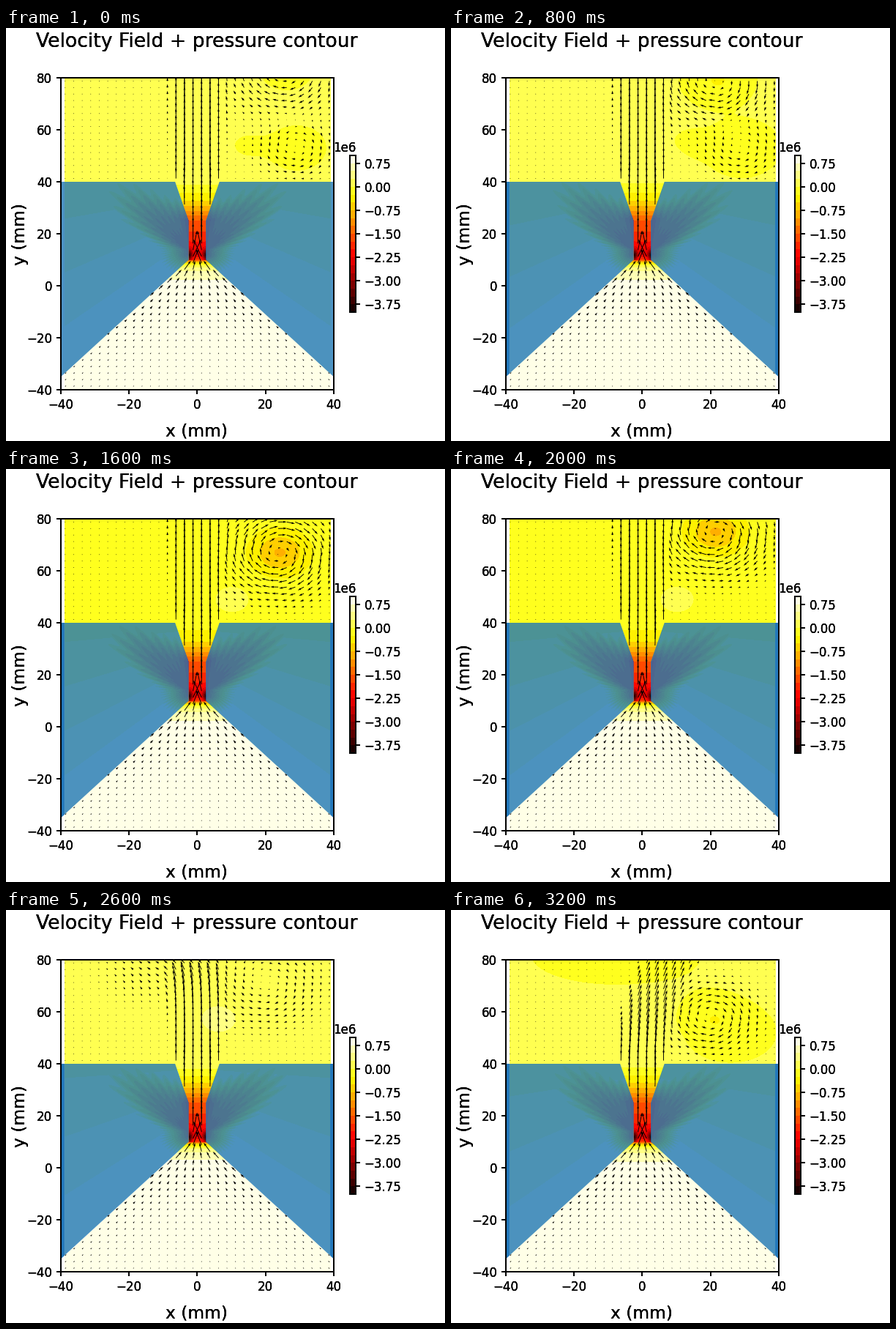
Animation of 600x564 px, one loop 3400 ms. Source, as a matplotlib script:

```python
import numpy as np
import matplotlib.pyplot as plt
from matplotlib.animation import FuncAnimation
from matplotlib.colors import BoundaryNorm, ListedColormap
from matplotlib.patches import Polygon

W, H, DPI = 600, 564, 120
FRAMES, INTERVAL = 17, 200
LEFT, TOP, RIGHT, BOTTOM = 75, 68, 447.8, 494
ASPECT = (RIGHT - LEFT) / 80 / ((BOTTOM - TOP) / 120)
TICK_PAD = 11.7

plt.rcParams.update({"font.family": "DejaVu Sans", "font.size": 10,
                     "axes.linewidth": 1.2, "xtick.major.width": 1.2,
                     "ytick.major.width": 1.2})


def bump(x, y, cx, cy, rx, ry=None):
    return np.exp(-((x - cx) / rx) ** 2 - ((y - cy) / (ry or rx)) ** 2)


def pulse(i, center, width):
    return np.exp(-((i - center) / width) ** 2)


def state(i):
    """Strength of each flow feature at step i."""
    steps = [0, 4, 6, 8, 11, 16]
    strong = pulse(i, 9, 4)
    sweep = pulse(i, 14, 1.3)
    late = np.clip((i - 14) / 2, 0, 1)
    return {
        "x": np.interp(i, steps, [26, 22, 21, 24, 20, 20]),
        "y": np.interp(i, steps, [83, 79, 70, 67, 79, 58]),
        "strong": strong,
        "sweep": sweep,
        "late": late,
        "pair": np.clip((6 - i) / 2, 0, 1),
        "base": .08 - .2 * strong + .33 * sweep,
        "lean": 8 * late,
    }


def half_width(y):
    return np.interp(y, [-40, 10, 25, 40, 40.001], [44.2, 2.5, 2.5, 6.5, 99])


def chamber_pressure(x, y, s):
    core = (.2 + .5 * s["strong"]) * (1 - s["sweep"])
    eddies = bump(x, y, 14, 54, 6) * .5 + bump(x, y, 29, 53, 9)
    trail = bump(x, y, -8, 82, 30, 14) + bump(x, y, 26, 52, 16, 14)
    shear = bump(x, y, 10 - 7 * s["sweep"], 49 + 15 * s["sweep"], 6)
    return (s["base"] - core * bump(x, y, s["x"], s["y"], 8)
            - .2 * s["pair"] * eddies - .2 * s["late"] * trail
            + .22 * max(s["strong"], s["sweep"]) * shear)


def pressure(x, y, s):
    w, side = half_width(y), np.abs(x)
    inlet = .97 + .35 * s["sweep"] * s["base"]
    cone = inlet - 2.8 * (2.5 / w) ** 2
    throat = np.interp(y, [10, 12, 25, 33, 40], [-1.7, -2.3, -1.5, -.45, s["base"]])
    throat = throat - 1.6 * bump(side, y, 2.5, 11.5, 1.1, 2.5)

    # Behind the walls the pressure is blended from the surrounding fluid.
    floor = 10 - (side - 2.5) * 1.2
    mix = np.clip((40 - y) / np.maximum(40 - floor, 1), 0, 1)
    gap = side - 2.5
    angle = np.degrees(np.arctan2(y - 14, gap))
    reach = (8 + 17 * pulse(angle, 45, 22)) * (1 + .1 * np.sin(angle * .9))
    distance = np.hypot(gap, y - np.clip(y, 12, 25))
    wing = 2.6 * np.clip(1 - distance / reach, 0, 1)
    wall = s["base"] + (inlet - s["base"]) * mix - wing

    p = np.where(y < 10, cone, throat)
    p = np.where(side > w, wall, p)
    return np.where(y >= 40, chamber_pressure(x, y, s), p)


def swirl(x, y, cx, cy, radius, speed):
    dx, dy = (x - cx) / radius, (y - cy) / radius
    k = speed * np.exp((1 - dx ** 2 - dy ** 2) / 2)
    return k * dy, -k * dx


def velocity(x, y, s):
    """Arrow components in pixels."""
    w = half_width(y)
    v_cone = 27 * 2.5 / w
    u_cone = -v_cone * x / w * .833 * ASPECT

    # Streams cross at the throat entry, then run straight up the nozzle.
    v_pipe = np.interp(y, [10, 15, 40], [22, 28, 25])
    u_pipe = -x * 1.8 * np.maximum(16.2 - y, 0) + .15 * x * (y > 25)

    # Jet and eddies in the open chamber
    h = np.clip((y - 40) / 40, 0, 1)
    profile = np.exp(-((x - s["lean"] * h ** 2) / (7.2 + 1.2 * h)) ** 6)
    cutoff = 1 / (1 + np.exp((y - 95 + 33 * s["sweep"]) / 2))
    v_jet = (24 - (6 + 7 * s["late"]) * h) * profile * cutoff
    u_jet = v_jet * s["lean"] * 2 * h / 40 * ASPECT
    speed = (9 + 3 * s["strong"]) * (1 - .8 * s["sweep"])
    u1, v1 = swirl(x, y, s["x"], s["y"], 10 - 2 * s["late"], speed)
    u2, v2 = swirl(x, y, 29, 53, 7, 6 * s["pair"])
    u_sweep = -10 * s["sweep"] * bump(x, y, -6, 77, 22, 11)
    v_sweep = 7 * s["sweep"] * bump(x, y, -16, 72, 13, 12)
    near_wall = np.clip((40 - np.abs(x)) / 4, 0, 1)
    near_floor = np.clip((y - 39) / 5, 0, 1)
    quiet = 1 - profile
    u_room = u_jet + (quiet * (u1 + u2) + u_sweep) * near_wall
    v_room = v_jet + (quiet * (v1 + v2) + v_sweep) * near_floor

    room, cone = y > 40, y < 10
    u = np.where(room, u_room, np.where(cone, u_cone, u_pipe))
    v = np.where(room, v_room, np.where(cone, v_cone, v_pipe))
    return u, v


def heavy_text(x, y, text, **style):
    """Overprint text at a pixel position so its edges turn solid."""
    for _ in range(3):
        fig.text(x / W, 1 - y / H, text, **style)


def pixel_axes(left, top, right, bottom):
    return fig.add_axes([left / W, 1 - bottom / H,
                         (right - left) / W, (bottom - top) / H])


def signed(value, digits=0):
    return f"{value:.{digits}f}".replace("-", "\u2212")


fig = plt.figure(figsize=(W / DPI, H / DPI), dpi=DPI, facecolor="white")
ax = pixel_axes(LEFT, TOP, RIGHT, BOTTOM)

levels = np.linspace(-4, 1, 21)
bands = plt.get_cmap("hot")((np.arange(20) + .5) / 20)
cmap = ListedColormap(bands)
cmap.set_over("white")

nx, ny = 363, 426
px, py = np.meshgrid(-39 + 78 * (np.arange(nx) + .5) / nx,
                     -40 + 120 * (np.arange(ny) + .5) / ny)
field = ax.imshow(np.zeros((ny, nx)), extent=(-39, 39, -40, 80), origin="lower",
                  cmap=cmap, norm=BoundaryNorm(levels, 20),
                  interpolation="nearest", aspect="auto")

strips = []
for side in (-1, 1):
    outline = [(40, -35), (2.5, 10), (2.5, 25), (6.5, 40), (40, 40)]
    ax.add_patch(Polygon([(side * x, y) for x, y in outline],
                         facecolor="#1f77b4", alpha=.8, lw=0))
    edge = [(40, -35), (39, -33.8), (39, 40), (40, 40)]
    strips.append(ax.add_patch(Polygon([(side * x, y) for x, y in edge],
                                       facecolor="#2277ba", lw=0)))

gx, gy = np.meshgrid(np.arange(-38.75, 40, 2.5), np.arange(-38.75, 80, 2.5))
fluid = np.abs(gx) < half_width(gy)
gx, gy = gx[fluid], gy[fluid]
arrows = ax.quiver(gx, gy, np.zeros_like(gx), np.ones_like(gy), color="black",
                   scale=1, scale_units="dots", units="dots", width=.95, zorder=3)

x_ticks, y_ticks = range(-40, 41, 20), range(-40, 81, 20)
ax.set(xlim=(-40, 40), ylim=(-40, 80), xticks=x_ticks, yticks=y_ticks,
       xticklabels=[], yticklabels=[])
for t in x_ticks:
    heavy_text(LEFT + (t + 40) / 80 * (RIGHT - LEFT), BOTTOM + TICK_PAD,
               signed(t), ha="center", va="top")
for t in y_ticks:
    heavy_text(LEFT - TICK_PAD, BOTTOM - (t + 40) / 120 * (BOTTOM - TOP),
               signed(t), ha="right", va="center_baseline")

bar = pixel_axes(470, 174, 478, 388)
bar.imshow(bands[:, None, :], extent=(0, 1, -4, 1), origin="lower",
           aspect="auto", interpolation="nearest")
bar_ticks = np.arange(.75, -4, -.75)
bar.yaxis.tick_right()
bar.set(xticks=[], yticks=bar_ticks, yticklabels=[])
for t in bar_ticks:
    heavy_text(478 + TICK_PAD, 174 + (1 - t) / 5 * 214, signed(t, 2),
               va="center_baseline")

heavy_text(261, 26, "Velocity Field + pressure contour", size=16, ha="center")
heavy_text(261, 557, "x (mm)", size=14, ha="center")
heavy_text(26, 281, "y (mm)", size=14, ha="center", rotation=90,
           rotation_mode="anchor")
heavy_text(447, 169, "1e6")


def update(i):
    s = state(i)
    field.set_data(np.maximum(pressure(px, py, s), -3.99))
    arrows.set_UVC(*velocity(gx, gy, s))
    for strip in strips:
        strip.set_visible(i > 0)
    return [field, arrows, *strips]


anim = FuncAnimation(fig, update, frames=FRAMES, interval=INTERVAL,
                     repeat=True, repeat_delay=0, blit=False)
plt.show()
```
